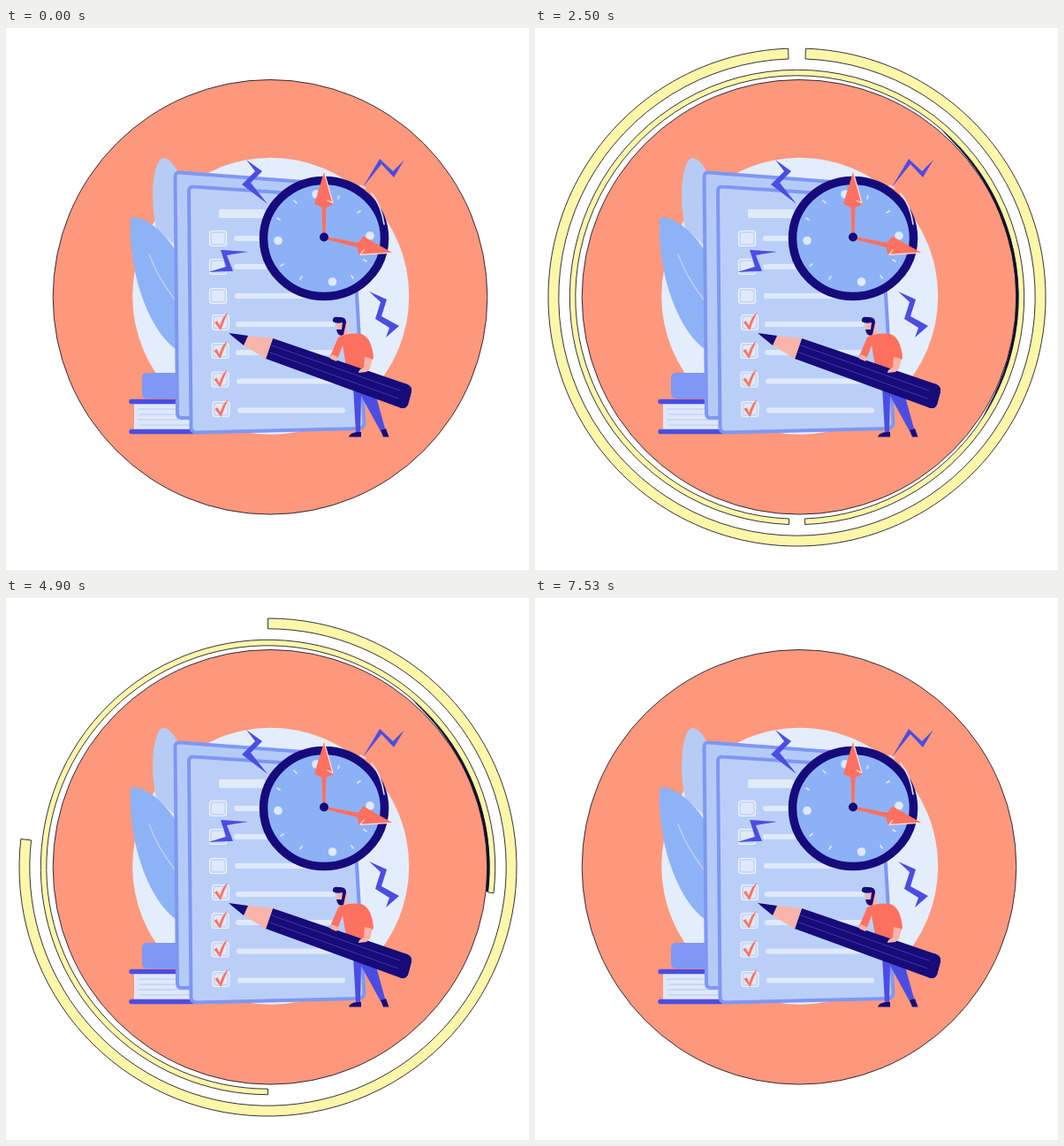
An HTML page that plays this animation: 592x613 px, repeating every 7660 ms.

```html
<!DOCTYPE html>
<html lang="en">
<head>
<meta charset="utf-8">
<title>Checklist and clock</title>
<style>
  html, body { margin: 0; width: 100%; height: 100%; overflow: hidden; background: #fff; }
  svg { display: block; width: 592px; height: 613px; }
  .ring { fill: #fcf7a8; stroke: #1c1b30; stroke-width: .9; }
  .navy { fill: #160b78; }
  .blue { fill: #4b4de2; }
  .red { fill: #ff705f; }
  .skin { fill: #f8b4a8; }
  .line { fill: none; stroke-linecap: round; stroke-linejoin: round; }
</style>
</head>
<body>
<svg viewBox="0 0 592 613">
  <path id="outer" class="ring"/>
  <path id="inner" class="ring"/>
  <circle cx="299" cy="304.3" r="245.8" fill="#fe987c" stroke="#1c1b30" stroke-width=".9"/>
  <path id="crescent" fill="#0d1030"/>
  <circle cx="299.7" cy="303.3" r="156.5" fill="#e4edfc"/>

  <!-- leaves -->
  <path d="M170 226C162 190 167 151 177 147C185 147 191 155 196 166V250Z" fill="#b6ccf5"/>
  <path d="M141 215C153 210 178 228 192 252V363C163 343 138 279 141 215Z" fill="#8eb2f6"/>
  <path class="line" d="M162 256Q172 283 191 307" stroke="#b9cff8" stroke-width="1.5"/>

  <!-- books -->
  <rect x="154" y="390" width="60" height="29" rx="5" fill="#7f97f5"/>
  <rect x="145" y="424" width="70" height="31" fill="#dfe8fa"/>
  <path d="M149 431H210M151 437H210M149 443H210M151 449H210" stroke="#b6c9f3"/>
  <path class="line" d="M142 422.5H212M142 456.5H212" stroke="#4b4de2" stroke-width="5.5"/>

  <!-- sheets -->
  <g class="line" stroke="#7e97f4" stroke-width="4">
    <path d="M197 163.500L376 177Q382 178 383 184L396 435L199 441Q194 441 194 436L191.500 169Q191 163 197 163.500Z" fill="#b5cbf7"/>
    <path d="M212 179.500L383 191Q390 192 391 198L405.500 447Q405 452 400 453L215 457.500Q210 457 209.500 452L207 185Q207 179 212 179.500Z" fill="#bacff8"/>
  </g>
  <rect x="241" y="205" width="52" height="10" rx="2" fill="#e1eafb"/>
  <path class="line" d="M261 238H296M261 270H305M262 303H369M263 335H370M263 367H370M264 399.500H380M265 432.500H381" stroke="#dfe9fb" stroke-width="6"/>
  <g id="boxes"></g>

  <!-- sparks -->
  <g class="blue">
    <path d="M272 149L290 162L277 175L296 199L267 177L282 162Z"/>
    <path d="M404 180L423 148L438 162L451 149L439 169L425 154Z"/>
    <path d="M274 253L250 257L257 275L229 276L249 270L243 251Z"/>
    <path d="M411 298L431 307L425 326L445 337L430 350L434 339L418 329L424 310Z"/>
  </g>

  <!-- clock -->
  <ellipse cx="360" cy="238" rx="68.500" ry="65.500" fill="#8db1f6" stroke="#160b7c" stroke-width="9.500"/>
  <g fill="#dfe9fb">
    <circle cx="308" cy="240.500" r="4.800"/><circle cx="351" cy="188" r="4.800"/>
    <circle cx="412" cy="235" r="4.800"/><circle cx="369.500" cy="287" r="4.800"/>
  </g>
  <path class="line" d="M326 195L329 198M307 215L310 217M311 269L314 267M333 284L335 281M376 193L377 190M398 209L401 207M405 262L408 264M391 280L393 283" stroke="#dfe9fb" stroke-width="1.600"/>
  <path class="line" d="M414 187Q425 201 428 222M401 178L407 181" stroke="#dfe4fb" stroke-width="1.600"/>
  <g id="hands"></g>
  <circle cx="360" cy="236.500" r="5" class="navy"/>

  <!-- person and pencil -->
  <path class="blue" d="M392 388H411L429 453L424 456L402 416L401 458H396Z"/>
  <path class="navy" d="M388 462.500Q389 458 397 457H402V462.500ZM424 455L430 453L433.500 462.500H427Z"/>
  <path class="skin" d="M376 333L386 332L387 350L378 351L374 341Z"/>
  <path class="navy" d="M370 332Q369 326 376 327Q385 326 385 333L382 347Q376 350 374 341L380 341L381 333Q374 335 370 332Z"/>
  <path class="red" d="M376 350Q387 344 402 346Q414 350 416 373L408 386L385 382L381 359L375 375L367 371Z"/>
  <path class="navy" d="M302 351L453 402.500Q460 405 459 411L455 426Q452 432 445 429L294 374Z"/>
  <path class="skin" d="M274 348L302 351L294 374L269 359Z"/>
  <path class="navy" d="M252 345L274 348L269 359Z"/>
  <path class="line" d="M301 359L446 410M299 367L444 419" stroke="#4038a8" stroke-width="1"/>
  <path class="navy" d="M447 402L453 402.500Q460 405 459 411L455 426Q452 432 445 429Z"/>
  <path class="skin" d="M406 372L414 374Q414 386 408 389L399 390Q399 386 405 384Z"/>
  <path class="skin" d="M369 369L377 373L374 377L367 374Z"/>
</svg>
<script>
const $ = id => document.getElementById(id);

// Checklist boxes: [x, y, ticked]
$('boxes').innerHTML = [
  [240, 238], [240, 270], [240, 303],
  [243, 333, 1], [242.5, 365, 1], [242.5, 397.5, 1], [243.5, 431, 1]
].map(([x, y, ticked]) => `<g transform="translate(${x} ${y})">
  <rect x="-9.500" y="-8.500" width="19" height="17" rx="3" fill="#c8d8f7" stroke="#eff4fd" stroke-width="1.200"/>
  <rect x="-7" y="-6" width="14" height="12" rx="2" fill="#e0e9fb"/>
  ${ticked ? '<path class="red" d="M-7 0L-4 -2L-1 4Q2 -7 8 -11Q4 -2 0 9Z"/>' : ''}
</g>`).join('');

// Clock hands: [angle, length]
$('hands').innerHTML = [[0, 74], [102.5, 79]].map(([angle, len]) =>
  `<g transform="translate(360 237) rotate(${angle})">
    <path class="red" d="M-1.500 0L-2.500 ${40 - len}L-11 ${36 - len}L0 ${-len}L11 ${36 - len}L2.500 ${40 - len}L1.500 0Z"/>
    <path class="line" d="M1 ${3 - len}L10 ${35 - len}L4 ${32 - len}" stroke="#ffe3df" stroke-width="1.200"/>
  </g>`).join('');

const CX = 296.5, CY = 304.5;
const LOOP = 7660, TICK = 100 / 3;
const STEPS = [0, 2, 4, 6, 9, 11, 14, 16, 19, 21, 24, 26, 29, 31, 34, 36];
const LATE_STEPS = [0, 3, 5, 7, 10, 12, 15, 17, 19, 22, 24, 27, 29, 31, 34, 36];
const PHASES = [
  { start: 8, grow: true, steps: STEPS },
  { start: 75, grow: false, steps: STEPS },
  { start: 123, grow: true, steps: STEPS },
  { start: 190, grow: false, steps: LATE_STEPS }
];
const smooth = u => u * u * (3 - 2 * u);
const roundTime = tick => Math.round(tick * TICK / 10) * 10;

// Angles run clockwise in degrees from twelve o'clock.
function polar(r, deg, cx = CX, cy = CY) {
  const a = deg * Math.PI / 180;
  return `${(cx + r * Math.sin(a)).toFixed(2)} ${(cy - r * Math.cos(a)).toFixed(2)}`;
}

function sector(r0, r1, from, to) {
  if (to - from < .01) return '';
  if (to - from > 359.99) {
    return [r1, r0].map((r, i) => {
      const arc = `A${r} ${r} 0 0 ${1 - i} `;
      return `M${polar(r, 0)}${arc}${polar(r, 180)}${arc}${polar(r, 0)}Z`;
    }).join('');
  }
  const large = to - from > 180 ? 1 : 0;
  return `M${polar(r1, from)}A${r1} ${r1} 0 ${large} 1 ${polar(r1, to)}` +
    `L${polar(r0, to)}A${r0} ${r0} 0 ${large} 0 ${polar(r0, from)}Z`;
}

// Dark sliver on the disc's right edge, uncovered with the inner ring.
function crescent(end) {
  const from = 40, to = Math.min(124, end);
  if (to <= from) return '';
  const rim = [], edge = [];
  for (let i = 0; i <= 24; i++) {
    const deg = from + (to - from) * i / 24;
    const width = 3 * Math.sqrt(Math.sin((deg - from) / 84 * Math.PI));
    rim.push(polar(248.4, deg, 299, 304.3));
    edge.unshift(polar(248.4 - width, deg, 299, 304.3));
  }
  return `M${rim.concat(edge).join('L')}Z`;
}

function draw(time) {
  let grow = true, p = 0;
  for (const phase of PHASES) {
    const done = phase.steps.filter(s => roundTime(phase.start + s) <= time + .01).length;
    if (done) {
      grow = phase.grow;
      p = smooth(done / phase.steps.length);
    }
  }
  const half = 180 * (1 - p);
  const outer = grow ? [0, 360 * p] : [180 - half, 180 + half];
  const inner = grow ? [-180, 360 * p - 180] : [-half, half];
  $('outer').setAttribute('d', sector(269.7, 281.5, ...outer));
  $('inner').setAttribute('d', sector(250.7, 257.2, ...inner));
  $('crescent').setAttribute('d', crescent(inner[1]));
}

const begun = performance.now();
function frame() {
  draw((performance.now() - begun) % LOOP);
  requestAnimationFrame(frame);
}
frame();
</script>
</body>
</html>
```
